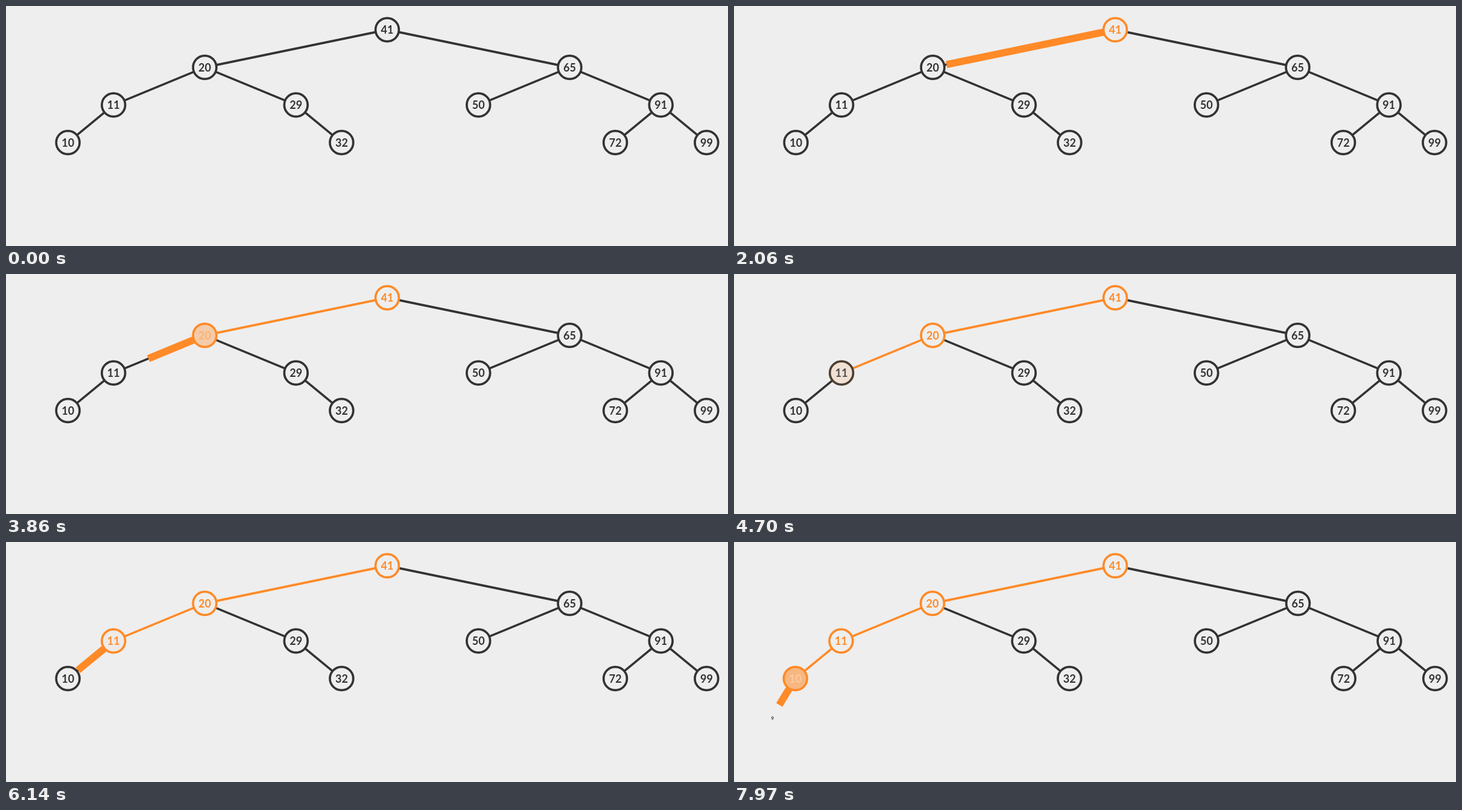
An HTML page with a canvas for the animation above (8 s loop, 1197 px wide and 399 px high).

```html
<!DOCTYPE html>
<html lang="en">
<head>
<meta charset="utf-8">
<title>Binary search tree insertion</title>
<style>
html, body { margin: 0; width: 100%; height: 100%; overflow: hidden; background: #eee; }
canvas { display: block; }
</style>
</head>
<body>
<canvas width="1197" height="399"></canvas>
<script>
const ctx = document.querySelector('canvas').getContext('2d');
const LOOP = 8000, DURATION = 900, RADIUS = 19.4, ROOT_X = 632;
const PAPER = [238, 238, 238], DARK = [51, 51, 51], ORANGE = [255, 138, 39], WHITE = [255, 255, 255];

// Each key is the route from the root to the node.
const tree = {
  '': 41, L: 20, R: 65, LL: 11, LR: 29, RL: 50, RR: 91,
  LLL: 10, LRR: 32, RRL: 72, RRR: 99
};
const NEW_NODE = 'LLLL';

// The search: fill a node, then release it while the next edge is drawn.
const visits = [
  { node: '', fill: 300, release: 1299, edge: 1299, settle: 2230 },
  { node: 'L', fill: 2393, release: 3359, edge: 3359, settle: 4275 },
  { node: 'LL', fill: 4412, release: 5430, edge: 5430, settle: 6345 },
  { node: 'LLL', fill: 6480, release: 7536, edge: 7490, settle: Infinity }
];

const mix = (a, b, p) => a.map((v, i) => v + (b[i] - v) * p);
const css = c => `rgb(${c.map(Math.round).join()})`;

function progress(time, start) {
  const t = Math.min(1, Math.max(0, (time - start) / DURATION));
  return t < 0.5 ? 4 * t ** 3 : 1 - 4 * (1 - t) ** 3;
}

function position(route, spread) {
  let dx = 0;
  [...route].forEach((side, i) => dx += (side === 'L' ? -1 : 1) * 302.5 / 2 ** i);
  return { x: ROOT_X + dx * spread, y: 39.5 + 62.5 * route.length };
}

// Line between two node rims, drawn up to the given share of its length.
function edge(from, to, color, width, share = 1, endRadius = RADIUS) {
  const dx = to.x - from.x, dy = to.y - from.y, length = Math.hypot(dx, dy);
  const start = RADIUS / length;
  const end = start + (1 - start - endRadius / length) * share;
  ctx.strokeStyle = css(color);
  ctx.lineWidth = width;
  ctx.beginPath();
  ctx.moveTo(from.x + dx * start, from.y + dy * start);
  ctx.lineTo(from.x + dx * end, from.y + dy * end);
  ctx.stroke();
}

function label(text, at, size, color) {
  ctx.font = `bold ${size}px Lato, "Noto Sans", sans-serif`;
  ctx.fillStyle = css(color);
  ctx.fillText(text, at.x, at.y + 6.5);
}

function node(value, at, fill, ring, ink) {
  ctx.beginPath();
  ctx.arc(at.x, at.y, RADIUS, 0, 2 * Math.PI);
  ctx.fillStyle = css(fill);
  ctx.fill();
  ctx.strokeStyle = css(ring);
  ctx.lineWidth = 3.7;
  ctx.stroke();
  label(value, at, 18, ink);
}

function draw(time) {
  const grow = progress(time, visits[3].release);
  const place = route => position(route, 1 + 0.0036 * grow);
  ctx.fillStyle = css(PAPER);
  ctx.fillRect(0, 0, 1197, 399);
  ctx.textAlign = 'center';

  for (const route of Object.keys(tree)) {
    if (!route) continue;
    const parent = route.slice(0, -1);
    const walked = visits.some(v => v.node + 'L' === route && time >= v.settle);
    edge(place(parent), place(route), walked ? ORANGE : DARK, 3.7);
  }
  for (const v of visits) {
    if (time <= v.edge || time >= v.settle) continue;
    const next = v.node + 'L';
    edge(place(v.node), place(next), ORANGE, 12, progress(time, v.edge), next === NEW_NODE ? 0 : RADIUS);
  }
  for (const [route, value] of Object.entries(tree)) {
    const v = visits.find(v => v.node === route);
    const lit = v ? progress(time, v.fill) : 0;
    const released = v ? progress(time, v.release) : 0;
    node(value, place(route),
      mix(mix(PAPER, ORANGE, lit), PAPER, released),
      mix(DARK, ORANGE, lit),
      mix(mix(DARK, WHITE, lit), ORANGE, released));
  }
  if (grow > 0) label(9, place(NEW_NODE), 18 * grow, DARK);
}

const begin = performance.now();
function tick() {
  draw((performance.now() - begin) % LOOP);
  requestAnimationFrame(tick);
}
tick();
</script>
</body>
</html>
```
